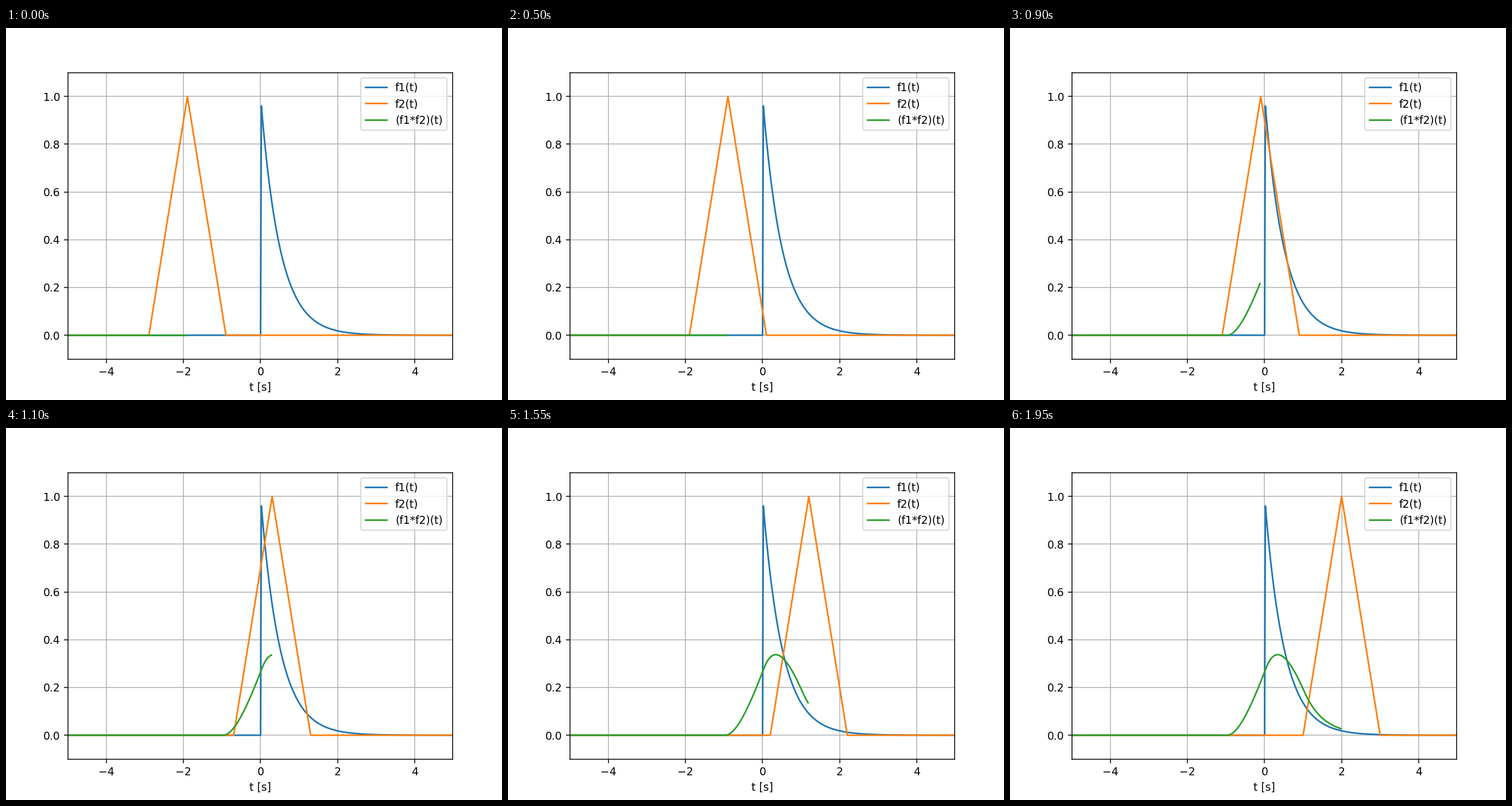
Write a matplotlib script that moves like this. It is 864 px wide and 648 px high and loops after 2 s.

```python
import numpy as np
import matplotlib.pyplot as plt
from matplotlib.animation import FuncAnimation

FRAMES = 40
INTERVAL = 50  # ms
DT = 0.02
START, STEP = -1.9, 0.1  # pulse centre and its advance per frame

t = (np.arange(500) - 250) * DT


def decay(x):
    return np.where(x > 0, np.exp(-2 * np.maximum(x, 0)), 0.0)


def triangle(x):
    return np.maximum(1 - np.abs(x), 0.0)


conv = np.convolve(decay(t), triangle(t), mode="same") * DT

fig, ax = plt.subplots(figsize=(6.4, 4.8), dpi=135)
ax.plot(t, decay(t), label="f1(t)")
pulse, = ax.plot([], [], label="f2(t)")
trace, = ax.plot([], [], label="(f1*f2)(t)")
ax.set_xlim(t[0], t[-1])
ax.set_ylim(-0.1, 1.1)
ax.set_xlabel("t [s]")
ax.grid(True)
ax.legend(loc="upper right")


def update(i):
    tau = START + STEP * i
    n = round((tau - t[0]) / DT)
    pulse.set_data(t, triangle(t - tau))
    trace.set_data(t[:n], conv[:n])
    return pulse, trace


anim = FuncAnimation(fig, update, frames=FRAMES, interval=INTERVAL,
                     repeat=True, repeat_delay=0)
plt.show()
```
